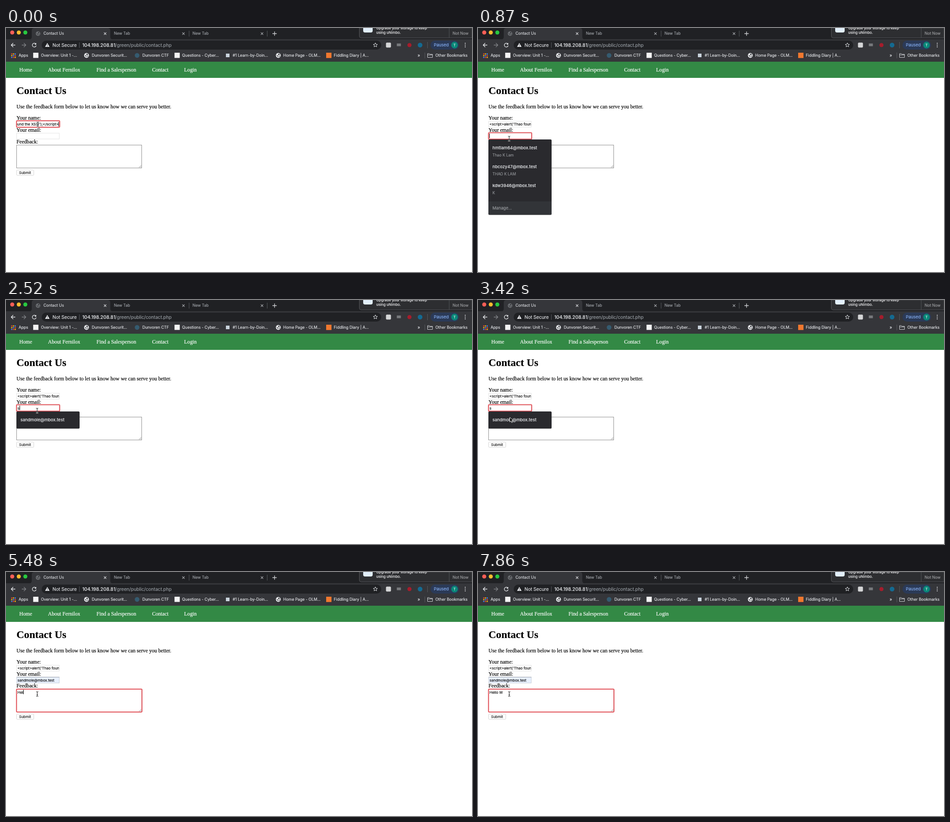
An HTML page for the animation above (8 s loop, 1032x543 px).

```html
<!DOCTYPE html>
<html lang="en">
<head>
<meta charset="utf-8">
<title>Contact Us</title>
<style>
html, body { margin: 0; width: 100%; height: 100%; overflow: hidden; background: #fff; }
svg { display: block; width: 100%; height: 100%; }
text { white-space: pre; }
.ui { font-family: Inter, "Open Sans", sans-serif; stroke-width: .14; }
.page { font-family: "Liberation Serif", "Times New Roman", serif; stroke-width: .2; }
</style>
</head>
<body>
<svg id="stage" viewBox="0 0 1032 543">
  <defs>
    <clipPath id="nameClip"><rect x="24.5" y="206" width="92.8" height="15"/></clipPath>
    <filter id="shadow" x="-10%" y="-10%" width="120%" height="125%">
      <feDropShadow dx="0" dy=".5" stdDeviation=".6" flood-opacity=".4"/>
    </filter>
  </defs>
  <g id="chrome"></g>
  <g id="page"></g>
  <g id="live"></g>
</svg>
<script>
const LOOP = 8000;
const FIELD_SIZE = 8;
const SCRIPT = "<script>alert('Thao found the XSS!');<\/script>";
const EMAIL = 'sandmole@mbox.test';
const layer = id => document.getElementById(id);

const escapeText = s => s.replace(/&/g, '&amp;').replace(/</g, '&lt;');
const attrs = o => Object.entries(o).map(([k, v]) => `${k}="${v}"`).join(' ');
const text = (x, y, s, size, fill, extra = {}, cls = 'ui') =>
  `<text class="${cls}" x="${x}" y="${y}" font-size="${size}" fill="${fill}" stroke="${fill}" ${attrs(extra)}>${escapeText(s)}</text>`;
const serif = (x, y, s, fill = '#000', size = 11.62, extra) => text(x, y, s, size, fill, extra, 'page');
const rect = (x, y, w, h, fill, extra = {}) =>
  `<rect x="${x}" y="${y}" width="${w}" height="${h}" fill="${fill}" ${attrs(extra)}/>`;
const circle = (x, y, r, fill, extra = {}) => `<circle cx="${x}" cy="${y}" r="${r}" fill="${fill}" ${attrs(extra)}/>`;
const line = (d, stroke, width = 1.2, fill = 'none') =>
  `<path d="${d}" stroke="${stroke}" stroke-width="${width}" fill="${fill}"/>`;

const cross = (x, y, color) => line(`M${x - 2.6} ${y - 2.6}l5.2 5.2m0 -5.2l-5.2 5.2`, color, 1.1);
const globe = (x, y, r, color, land) => circle(x, y, r, color) +
  `<path d="M${x - r * .8} ${y - r * .2}l${r * .7} ${r * .3}l${r * .1} ${r * .7}z
    M${x} ${y - r * .75}l${r * .65} ${r * .2}l${-r * .3} ${r * .5}l${-r * .4} ${-r * .2}z
    M${x + r * .3} ${y + r * .15}l${r * .45} ${r * .05}l${-r * .4} ${r * .5}z" fill="${land}"/>`;

function tabStrip() {
  const tabs = [[83, 219.5, 'Contact Us'], [239, 393, 'New Tab'], [413, 567, 'New Tab']];
  return rect(0, 0, 1032, 26, '#202124') +
    '<path d="M51 25.5q6 0 6 -6V6q0 -6 6 -6h162q6 0 6 6v13.5q0 6 6 6z" fill="#35363a"/>' +
    ['#ff5f57', '#febc2e', '#28c840'].map((c, i) => circle(13.8 + i * 14.5, 10, 4.5, c)).join('') +
    globe(71, 12.5, 5, '#6d7074', '#35363a') +
    tabs.map(([x, close, s], i) => text(x, 15.4, s, 8.6, i ? '#a3a7ac' : '#dfe1e5') +
      cross(close, 12.5, i ? '#b4b7bb' : '#e8eaed')).join('') +
    line('M405.5 6v13M578.5 6v13', '#55585c', 1) +
    line('M590 12.5h9.5M594.7 7.8v9.5', '#d5d7da', 1.3);
}

function notification() {
  return '<path d="M782.5 0v18q0 4 4 4H1032V0z" fill="#2d2e31" stroke="#55575a" stroke-width="1"/>' +
    line('M981.5 0v21.5', '#505255', 1) +
    '<path d="M791 0h21v6q0 4 -4 4h-13q-4 0 -4 -4z" fill="#e2effb"/>' +
    text(820, 3.4, 'Upgrade your storage to keep', 7.9, '#e4e4e6', { 'font-weight': 500 }) +
    text(820, 13.2, 'using uNimbo.', 7.9, '#e4e4e6', { 'font-weight': 500 }) +
    text(989, 14.6, 'Not Now', 8.6, '#a2a3a6');
}

function toolbar() {
  const star = Array.from({ length: 10 }, (_, i) => {
    const a = -Math.PI / 2 + i * Math.PI / 5, r = i % 2 ? 2.2 : 5;
    return `${(818 + r * Math.cos(a)).toFixed(2)},${(38 + r * Math.sin(a)).toFixed(2)}`;
  }).join(' ');
  const arrow = (x, dir, color) =>
    line(`M${x - 4.5 * dir} 38h${9 * dir}m${-4.5 * dir} -4.5l${4.5 * dir} 4.5l${-4.5 * dir} 4.5`, color, 1.3);
  return rect(0, 25, 1032, 50, '#35363a') +
    arrow(16, -1, '#e8eaed') + arrow(39.5, 1, '#808387') +
    line('M65.8 35.2A4.3 4.3 0 1 0 66.8 39', '#e8eaed', 1.3) +
    '<path d="M67 33v4h-4z" fill="#e8eaed"/>' +
    rect(79, 28, 752, 20, '#202124', { rx: 10 }) +
    '<path d="M91.5 33.3l5 8.7h-10z" fill="#e8eaed"/>' + line('M91.5 36.3v2.7M91.5 40v1', '#202124', 1) +
    text(103, 41.5, 'Not Secure', 10.15, '#e8eaed') +
    line('M162.5 32v12', '#55585c', 1) +
    text(169, 41.5, '104.198.208.81', 10.4, '#e8eaed', { 'font-weight': 500 }) +
    text(241.8, 41.5, '/green/public/contact.php', 10.15, '#9aa0a6') +
    `<polygon points="${star}" fill="none" stroke="#dadce0" stroke-width="1"/>` +
    rect(841.5, 32.5, 11, 11, '#d5d6d7', { rx: 2 }) +
    rect(865.5, 34.5, 9, 6, '#77797c') +
    circle(893.5, 38, 4.6, '#a51d2c') + circle(917, 38, 5.2, '#146a91') +
    line('M933.5 31v14', '#57595d', 1) +
    rect(940, 28, 63.5, 20, '#2b3a57', { rx: 10 }) +
    text(947.5, 41.4, 'Paused', 9.4, '#8ab4f8') +
    circle(993.3, 38, 7.4, '#0a8779') +
    text(993.3, 41, 'T', 8, '#e5f5f2', { 'text-anchor': 'middle' }) +
    [34, 38, 42].map(y => circle(1017, y, 1.1, '#e8eaed')).join('');
}

function bookmarks() {
  const items = [[28, 'Apps'], [77.5, 'Overview: Unit 1 -...'], [190, 'Dunvoren Securit...'], [302, 'Dunvoren CTF'],
    [390, 'Questions - Cyber...'], [502, '#1 Learn-by-Doin...'], [614, 'Home Page - OLM...'],
    [726, 'Fiddling Diary | A...'], [951, 'Other Bookmarks']];
  const dots = ['#ea4335', '#fbbc04', '#4285f4'];
  let apps = '';
  for (let i = 0; i < 9; i++) {
    const row = Math.floor(i / 3);
    apps += rect(11.5 + i % 3 * 3.8, 56.5 + row * 3.8, 2.6, 2.6, dots[(row + i) % 3]);
  }
  return apps + items.map(([x, s]) => text(x, 64, s, 8.65, '#e8eaed')).join('') +
    rect(60.2, 55, 11.6, 11.6, '#f4f4f4') + globe(178.3, 61, 5.4, '#e8eaed', '#35363a') +
    circle(290.3, 61, 5.2, '#355b70') + rect(373.2, 55, 11.6, 11.6, '#f4f4f4') +
    rect(487, 57, 8, 8, '#c9d3dc') + globe(603, 61, 5.4, '#e8eaed', '#35363a') +
    rect(709, 55, 11.8, 11.8, '#f0782f') +
    text(911.5, 63.5, '»', 9.5, '#e8eaed') +
    line('M927.5 54.5v13', '#57595d', 1) +
    line('M933.5 57h4l1.3 1.5h5.7v7h-11z', '#d0d2d5', 1) + line('M933.5 60h11', '#d0d2d5', 1);
}

function pageBody() {
  const nav = [[29.5, 'Home'], [93, 'About Fernilox'], [200.5, 'Find a Salesperson'], [323.5, 'Contact'], [394.5, 'Login']];
  return rect(0, 75, 1032, 36, '#338945') +
    nav.map(([x, s]) => serif(x, 97.3, s, '#fff')).join('') +
    serif(23.3, 147.2, 'Contact Us', '#000', 23.2, { 'font-weight': 700 }) +
    serif(23.3, 179, 'Use the feedback form below to let us know how we can serve you better.') +
    serif(23.3, 204, 'Your name:') + serif(23.3, 230.7, 'Your email:') + serif(23.3, 257.4, 'Feedback:') +
    rect(23.5, 260.5, 277, 51, '#fff', { stroke: '#8e8e8e' }) +
    line('M294.5 310.5l5 -5M297.3 310.5l2.3 -2.3', '#777', .8) +
    rect(23.5, 316, 38, 12, '#fff', { rx: 2, stroke: '#d0d0d0', 'stroke-width': .9 }) +
    text(29, 324.8, 'Submit', FIELD_SIZE, '#111');
}

const measure = (() => {
  const ctx = document.createElement('canvas').getContext('2d');
  return s => {
    ctx.font = '80px Inter, "Open Sans", sans-serif';
    return ctx.measureText(s).width * FIELD_SIZE / 80;
  };
})();

const fields = {
  name: { ring: [23.3, 206.4, 95.6, 14.4], caretY: 209 },
  email: { ring: [23.3, 233, 95.6, 14.4], caretY: 235 },
  feedback: { ring: [23.3, 260.6, 277.8, 51], caretY: 262 }
};

const people = [['hmtlam64@mbox.test', 'Thao K Lam'], ['nbcozy47@mbox.test', 'THAO K LAM'], ['kdw3946@mbox.test', 'K']];

function menu(kind) {
  if (!kind) return '';
  const full = kind === 'all';
  const height = full ? 167.5 : 38;
  const entry = (s, y) => text(32, y, s, 9.4, '#e4e6e9', { 'font-weight': 500 });
  let out = rect(23, 248, 140, height, '#292a2d', { rx: 2.5, filter: 'url(#shadow)' });
  if (!full) return out + (kind === 'hover' ? rect(23, 252, 140, 30, '#3f4042') : '') + entry(EMAIL, 270.3);
  people.forEach(([mail, who], i) => {
    out += entry(mail, 270.3 + i * 42) + text(32, 285.5 + i * 42, who, 8.4, '#96999d');
  });
  return out + '<path d="M23 386h140v27q0 2.5 -2.5 2.5h-135q-2.5 0 -2.5 -2.5z" fill="#323438"/>' +
    text(32, 404.4, 'Manage...', 9.2, '#9fa2a6');
}

function pointer({ x, y, arrow }) {
  if (arrow) return line(`M${x} ${y - 6}v10.5l2.5 -2.3l1.7 3.8l1.7 -.8l-1.7 -3.6h3.4z`, '#f4f4f4', .9, '#000');
  const beam = `M${x - 2.3} ${y - 5.3}q2.3 0 2.3 1.5q0 -1.5 2.3 -1.5M${x} ${y - 4}v8
    M${x - 2.3} ${y + 5.3}q2.3 0 2.3 -1.5q0 1.5 2.3 1.5M${x - 1.3} ${y + 1.5}h2.6`;
  return line(beam, '#fff', 2.2) + line(beam, '#111', 1);
}

// Each step changes part of the state and keeps the rest.
const at = (x, y, arrow = false) => ({ x, y, arrow });
const typed = (feedback, caret = true) => ({ feedback, caret });
const smooth = p => p * p * (3 - 2 * p);
const glide = [140, 290, 430, 580, 720].map((time, i, all) => {
  const p = smooth((i + 1) / all.length);
  return [time, { mouse: at(70.5 - 1.5 * p, 214.5 + 31.5 * p), caret: i < 2 }];
});
const steps = [
  [0, { focus: 'name', email: '', feedback: '', filled: false, caret: true, menu: '', mouse: at(70.5, 214.5) }],
  ...glide,
  [870, { focus: 'email', menu: 'all', caret: true }],
  [1470, { caret: false }],
  [1920, { caret: true }],
  [2370, { caret: false }],
  [2520, { email: 's', caret: true, menu: 'one' }],
  [2970, { caret: false }],
  [3420, { mouse: at(70.5, 267, true) }],
  [3570, { menu: 'hover', email: EMAIL, filled: true }],
  [3710, { menu: '', caret: true }],
  [3850, { mouse: at(70.5, 267.5) }],
  [4000, { mouse: at(70, 270) }],
  [4140, { mouse: at(69.2, 271.5) }],
  [4290, { focus: 'feedback' }],
  [4740, { caret: false }],
  [5190, typed('H')],
  [5480, typed('Hel')],
  [5630, typed('Hell')],
  [5930, typed('Hello')],
  [6230, typed('Hello ')],
  [6530, typed('Hello W')],
  [6680, typed('Hello Wo')],
  [6820, typed('Hello Wor')],
  [6970, typed('Hello Worl')],
  [7410, { caret: false }],
  [7560, typed('Hello Wor')],
  [7710, typed('Hello Wo')],
  [7860, typed('Hello W', false)]
];

function render(s) {
  const inName = s.focus === 'name';
  const { ring, caretY } = fields[s.focus];
  const [x, y, w, h] = ring;
  const caretX = inName ? 116 : Math.round(25.4 + measure(s[s.focus]));
  const box = (top, fill, edge) => rect(23.7, top, 94.3, 13, fill, { stroke: edge, 'stroke-width': .8 });
  return box(207.3, '#fff', '#dcdcdc') +
    box(234, s.filled ? '#e8f0fe' : '#fff', s.filled ? '#bcc3ce' : '#dcdcdc') +
    (s.filled ? line('M23.5 234h94.8', '#979da6', .8) : '') +
    rect(x, y, w, h, 'none', { rx: 1.5, stroke: '#f3aeb0', 'stroke-width': 2.8, opacity: .6 }) +
    rect(x, y, w, h, 'none', { rx: 1.5, stroke: '#df4b53', 'stroke-width': 1.7 }) +
    '<g clip-path="url(#nameClip)">' +
    text(inName ? 116.2 : 25.5, 216.8, SCRIPT, FIELD_SIZE, '#000', { 'text-anchor': inName ? 'end' : 'start' }) + '</g>' +
    text(25.5, 243.6, s.email, FIELD_SIZE, '#000') +
    text(25.5, 270.6, s.feedback, FIELD_SIZE, '#000') +
    (s.caret ? rect(caretX, caretY, 1, 10, '#000') : '') +
    menu(s.menu) + pointer(s.mouse);
}

layer('chrome').innerHTML = tabStrip() + notification() + toolbar() + bookmarks();
layer('page').innerHTML = pageBody();

let shown = -1;
function draw(time) {
  const t = time % LOOP;
  const index = steps.filter(([start]) => start <= t).length - 1;
  if (index !== shown) {
    shown = index;
    const state = Object.assign({}, ...steps.slice(0, index + 1).map(step => step[1]));
    layer('live').innerHTML = render(state);
  }
}

const begin = performance.now();
function tick() {
  draw(performance.now() - begin);
  requestAnimationFrame(tick);
}
tick();
</script>
</body>
</html>
```
